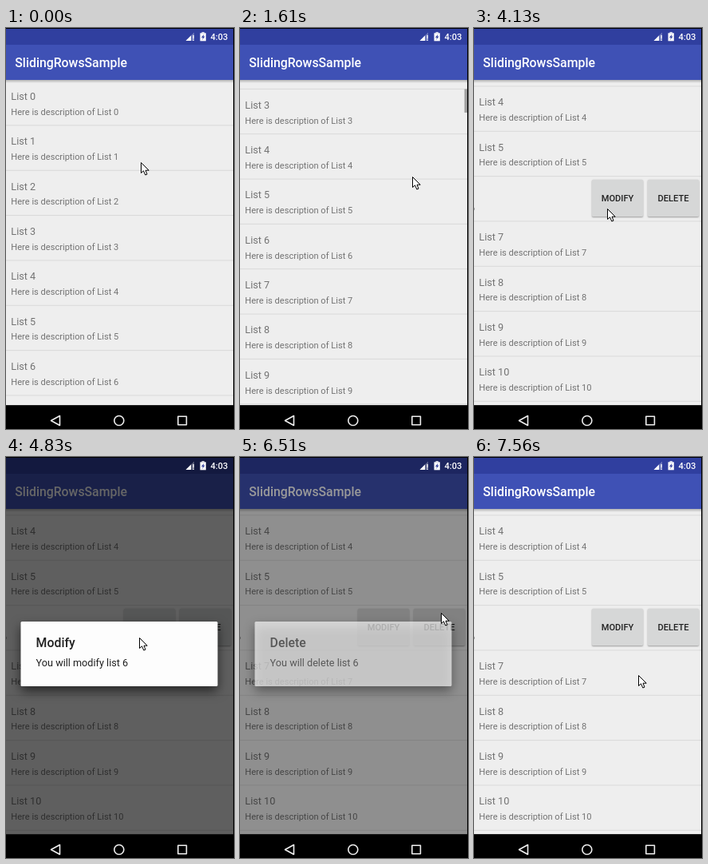
Write an HTML page with a canvas that moves like this. It is 286x502 px and loops after 8 s.

```html
<!DOCTYPE html>
<html lang="en">
<head>
<meta charset="utf-8">
<title>Swipeable list</title>
<style>
  html, body { margin: 0; width: 100%; height: 100%; overflow: hidden; background: #000; }
  canvas { display: block; }
</style>
</head>
<body>
<canvas id="stage" width="286" height="502"></canvas>
<script>
const ctx = document.getElementById('stage').getContext('2d');

const LOOP = 8000, STEP = 70;
const WIDTH = 285, BAR_BOTTOM = 65, LIST_BOTTOM = 472.5;
const DP = 0.792; // stage pixels per layout unit
const ROW_H = 71.13 * DP, ROW_COUNT = 100, SWIPED_ROW = 6, MENU_W = 140;
const SMALL = 14 * DP, MEDIUM = 16 * DP, LARGE = 20 * DP;

const PULLS = [420, 1400], PULL_TIME = 465, PULL_CYCLE = 840, PULL_SCROLL = 109;
const SWIPE_START = 2450, SWIPE_END = 3220, SWIPE_X = 240;
const FADE = 210;
const DIALOGS = [
  { action: 'Modify', open: 4480, close: 5390 },
  { action: 'Delete', open: 6370, close: 7210 }
];

const ramp = (t, from, to) => Math.min(1, Math.max(0, (t - from) / (to - from)));
const smooth = k => k * k * (3 - 2 * k);
const sumPulls = part => PULLS.reduce((sum, start) => sum + part(start), 0);

const scrollAt = t => PULL_SCROLL * sumPulls(s => ramp(t, s, s + PULL_TIME));

function cursorAt(t) {
  let x = 169, y = 168;
  const glide = (toX, toY, arrival, duration = 280) => {
    const k = smooth(ramp(t, arrival - duration, arrival));
    x += (toX - x) * k;
    y += (toY - y) * k;
  };
  glide(170, 241, 280);
  // Each pull drags the list up, then the pointer comes back down
  x += 70 * ramp(t, PULLS[0], 2240);
  y -= 121 * sumPulls(s => ramp(t, s, s + PULL_TIME) - ramp(t, s + PULL_TIME, s + PULL_CYCLE));
  glide(SWIPE_X, 212, 2240);
  glide(117, 220, SWIPE_END, SWIPE_END - SWIPE_START);
  glide(167, 226, 4130, 420);
  glide(182, 163, 5250, 210);
  glide(209, 166, 5600, 210);
  glide(252, 195, 5810, 210);
  glide(233, 138, 6860);
  glide(206, 273, 7560);
  return { x, y };
}

function swipeAt(t, cursorX) {
  if (t < SWIPE_START) return 0;
  return t > SWIPE_END ? -MENU_W : cursorX - SWIPE_X;
}

function rect(x, y, w, h, color) {
  ctx.fillStyle = color;
  ctx.fillRect(x, y, w, h);
}

function text(str, x, y, size, color, weight = 400, align = 'left') {
  ctx.font = `${weight} ${size}px Roboto, sans-serif`;
  ctx.textAlign = align;
  ctx.fillStyle = color;
  ctx.fillText(str, x, y);
}

function polygon(color, ...points) {
  ctx.beginPath();
  points.forEach(([x, y]) => ctx.lineTo(x, y));
  ctx.closePath();
  ctx.fillStyle = color;
  ctx.fill();
}

function card(x, y, w, h, color, blur, drop, shadow) {
  ctx.save();
  ctx.shadowColor = `rgba(0,0,0,${shadow})`;
  ctx.shadowBlur = blur;
  ctx.shadowOffsetY = drop;
  ctx.fillStyle = color;
  ctx.beginPath();
  ctx.roundRect(x, y, w, h, 2 * DP);
  ctx.fill();
  ctx.restore();
}

function drawRow(index, top, shift) {
  const left = 8 * DP + shift;
  text(`List ${index}`, left, top + 24.6, MEDIUM, '#737373');
  text(`Here is description of List ${index}`, left, top + 43.5, SMALL, '#737373');
  if (shift) {
    ['MODIFY', 'DELETE'].forEach((label, i) => {
      const x = WIDTH + 3 + shift + i * MENU_W / 2;
      card(x, top + 4.5, 64, 46.3, '#d6d7d7', 2, 1, 0.35);
      text(label, x + 32, top + 32, SMALL, '#212121', 500, 'center');
    });
  }
  rect(0, top + ROW_H - 0.2, WIDTH, 1, '#d9d9d9');
}

function drawList(t, cursorX) {
  const scroll = scrollAt(t), height = LIST_BOTTOM - BAR_BOTTOM;
  ctx.save();
  ctx.beginPath();
  ctx.rect(0, BAR_BOTTOM, WIDTH, height);
  ctx.clip();
  rect(0, BAR_BOTTOM, WIDTH, height, '#eeeeee');

  const first = Math.floor(scroll / ROW_H);
  for (let i = first; i < first + 9; i++) {
    const top = BAR_BOTTOM + 0.3 + i * ROW_H - scroll;
    drawRow(i, top, i === SWIPED_ROW ? swipeAt(t, cursorX) : 0);
  }

  const ratio = height / (ROW_H * ROW_COUNT);
  ctx.globalAlpha = ramp(t, 420, 490) - ramp(t, 2380, 2660);
  rect(281.5, BAR_BOTTOM + scroll * ratio, 3.5, height * ratio, '#a0a0a0');
  ctx.globalAlpha = 1;

  const shade = ctx.createLinearGradient(0, BAR_BOTTOM, 0, BAR_BOTTOM + 4);
  shade.addColorStop(0, 'rgba(0,0,0,.25)');
  shade.addColorStop(1, 'rgba(0,0,0,0)');
  rect(0, BAR_BOTTOM, WIDTH, 4, shade);
  ctx.restore();
}

function drawAppBar() {
  rect(0, 1, WIDTH, 20, '#303f9f');
  rect(0, 21, WIDTH, BAR_BOTTOM - 21, '#3f51b5');
  text('SlidingRowsSample', 11.3, 49.3, LARGE, '#fff', 500);
}

function drawDialog({ action, open, close }, t) {
  const alpha = ramp(t, open, open + FADE) - ramp(t, close, close + FADE);
  if (!alpha) return;
  rect(0, 1, WIDTH, LIST_BOTTOM - 1, `rgba(0,0,0,${0.6 * alpha})`);
  ctx.globalAlpha = alpha;
  card(18.5, 206, 247, 81, '#fdfdfd', 14, 6, 0.6);
  text(action, 37.6, 238, LARGE, '#212121', 500);
  text(`You will ${action.toLowerCase()} list ${SWIPED_ROW}`, 37.6, 262, MEDIUM, '#212121');
  ctx.globalAlpha = 1;
}

function drawStatusIcons() {
  polygon('rgba(255,255,255,.3)', [225.5, 16], [236, 5.5], [236, 16]);
  polygon('#fff', [225.5, 16], [232, 9.5], [232, 16]);
  rect(234.5, 9, 1.3, 4.6, '#fff');
  rect(234.5, 14.6, 1.3, 1.4, '#fff');

  rect(243.5, 6.3, 7.3, 10, '#fff');
  rect(245.5, 5.2, 3.3, 1.2, '#fff');
  polygon('#303f9f', [248.5, 7.5], [245, 12], [247, 12], [246, 15], [249.5, 10.5], [247.5, 10.5]);
  text('4:03', 278.3, 15, SMALL, '#fff', 500, 'right');
}

function drawNavigation() {
  rect(0, LIST_BOTTOM, 286, 30, '#000');
  ctx.strokeStyle = '#eee';
  ctx.lineWidth = 1.6;
  ctx.lineJoin = 'round';
  polygon('#000', [56.5, 491.5], [67.5, 485.5], [67.5, 497.5]);
  ctx.stroke();
  ctx.beginPath();
  ctx.arc(141.8, 491.5, 6, 0, Math.PI * 2);
  ctx.stroke();
  ctx.strokeRect(215.8, 486.2, 10.6, 10.6);
}

function drawCursor({ x, y }) {
  ctx.save();
  ctx.translate(Math.round(x) + 0.5, Math.round(y) + 0.5);
  polygon('#fff', [0, 0], [0, 13], [3, 10.3], [5.3, 15.5], [7.5, 14.6], [5.5, 9.7], [9.7, 9.7]);
  ctx.strokeStyle = '#000';
  ctx.lineWidth = 1;
  ctx.lineJoin = 'miter';
  ctx.stroke();
  ctx.restore();
}

function draw(t) {
  const cursor = cursorAt(t);
  rect(0, 0, 286, 502, '#000');
  drawList(t, cursor.x);
  drawAppBar();
  DIALOGS.forEach(dialog => drawDialog(dialog, t));
  drawStatusIcons();
  drawNavigation();
  drawCursor(cursor);
}

const start = performance.now();
function tick() {
  const t = (performance.now() - start) % LOOP;
  draw(Math.floor(t / STEP) * STEP);
  requestAnimationFrame(tick);
}
tick();
</script>
</body>
</html>
```
